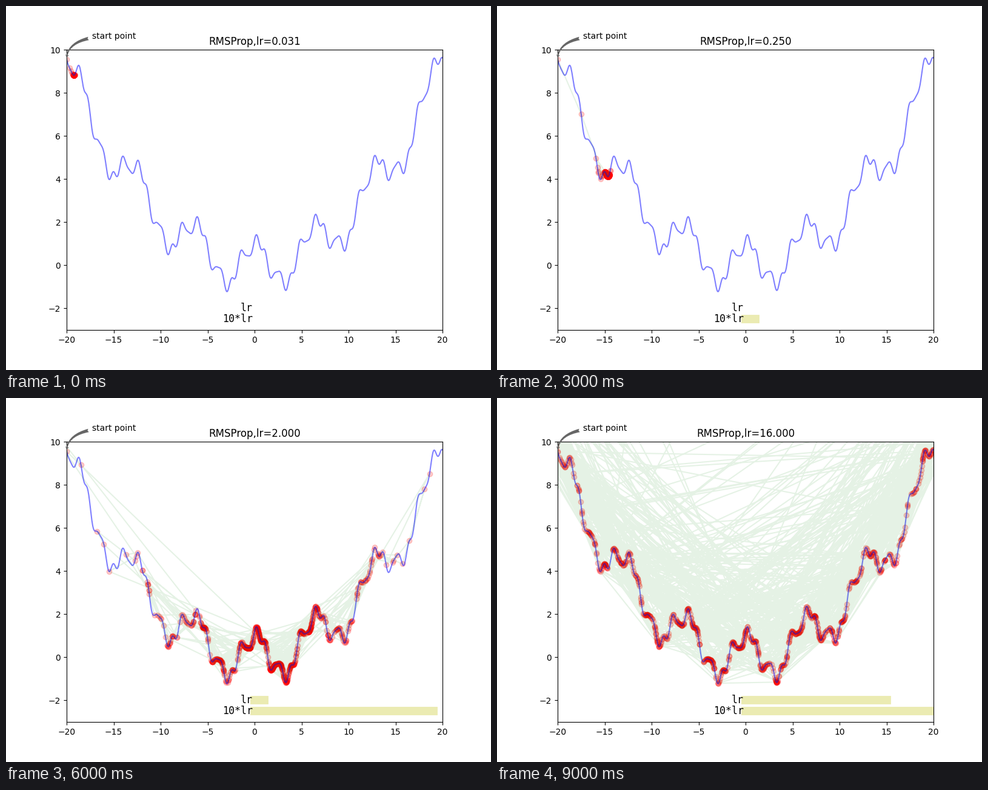
Animation, 800 px wide and 600 px high, one loop 10000 ms. Source, as a matplotlib script:

```python
import numpy as np
import matplotlib.pyplot as plt
from matplotlib.animation import FuncAnimation

START = -20.0
STEPS = 1000
RHO = 0.99
DELTA = 1e-6


def f(x):
    return (0.15 * x) ** 2 + np.cos(x) + np.sin(3 * x) / 3 + np.cos(5 * x) / 5 + np.sin(7 * x) / 7


def df(x):
    return (9 / 200) * x - np.sin(x) - np.sin(5 * x) + np.cos(3 * x) + np.cos(7 * x)


def rmsprop(lr):
    x, r = START, 0.0
    path = []
    for _ in range(STEPS):
        path.append(x)
        g = df(x)
        r = RHO * r + (1 - RHO) * g * g
        x -= lr / (DELTA + np.sqrt(r)) * g
    return np.array(path)


def bar(length, y, label):
    xs = range(int(length))
    ax.plot(xs, [y] * len(xs), c="y", lw=10, alpha=0.3)
    ax.text(-0.2, y, label, size=12, family="DejaVu Sans Mono", ha="right", va="center")


def draw(i):
    lr = 2.0 ** (i - 5)
    ax.clear()
    ax.set_xlim(-20, 20)
    ax.set_ylim(-3, 10)
    ax.set_title(f"RMSProp,lr={lr:.3f}")

    ax.plot(curve_x, f(curve_x), c="b", alpha=0.5)
    path = rmsprop(lr)
    ax.plot(path, f(path), c="g", alpha=0.1)
    ax.scatter(path, f(path), c="r", alpha=0.2)

    bar(lr, -2, "lr")
    bar(10 * lr, -2.5, "10*lr")
    ax.annotate("start point", xy=(START, f(START)), xytext=(30, 25),
                textcoords="offset points",
                arrowprops=dict(arrowstyle="fancy", fc="0.4", ec="none",
                                connectionstyle="angle3,angleA=0,angleB=-90"))


plt.rcParams["font.family"] = "DejaVu Sans"
fig, ax = plt.subplots(figsize=(8, 6), dpi=100)
curve_x = np.linspace(-20, 20, 1000)

anim = FuncAnimation(fig, draw, frames=10, init_func=lambda: None,
                     interval=1000, repeat=True, repeat_delay=0)
plt.show()
```
